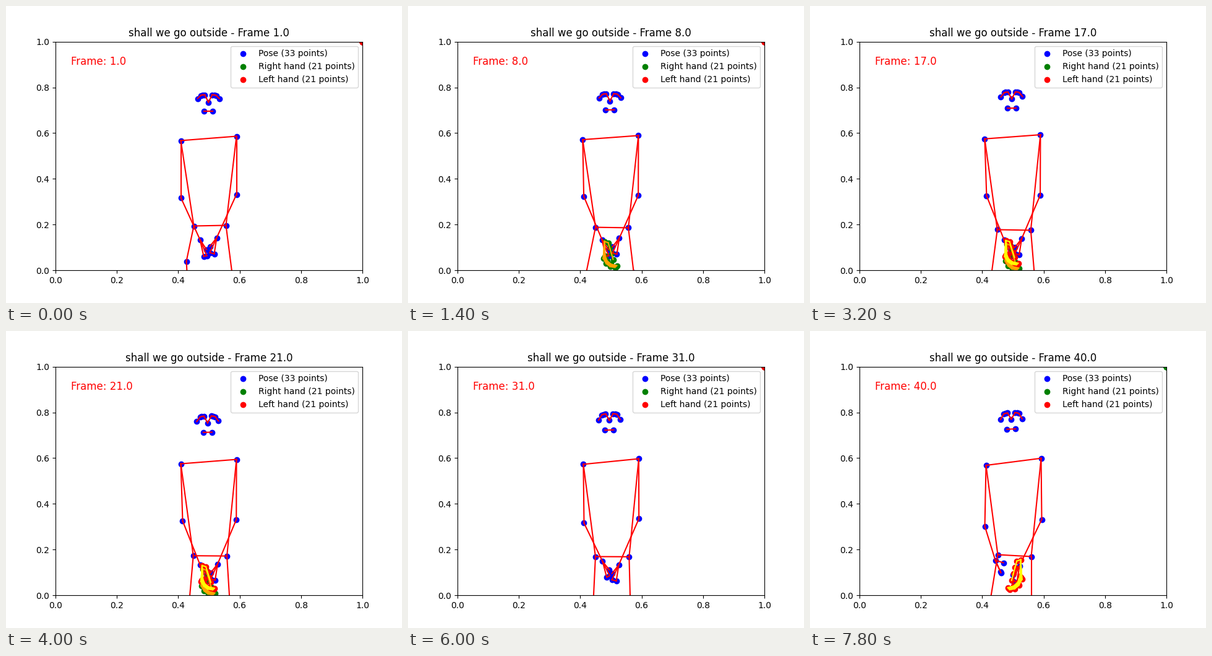
A matplotlib script that plays this animation: 640x480 px, repeating every 8 s.

```python
import numpy as np
import matplotlib.pyplot as plt
from matplotlib.animation import FuncAnimation
from matplotlib.collections import LineCollection

FRAMES, STEP = 40, 200

# Joint drift in stage pixels: start, end, bulge at mid-loop, double wave.
DRIFT = {
    "r_shoulder": ((282, 217), (284, 216.6), (-1, -2.7), (0, 0)),
    "l_shoulder": ((372, 210), (373, 205.2), (-0.5, -0.5), (0, 0)),
    "r_elbow": ((282, 309), (282, 315), (3, -5.5), (0, 0)),
    "l_elbow": ((372, 304), (374, 304), (-1.3, 0.5), (0, 1.5)),
    "l_wrist": ((340, 374), (338, 379), (2.5, -0.5), (0, 0)),
    "r_hip": ((303, 355), (303, 361), (-0.8, 4.5), (0, -1.5)),
    "l_hip": ((355, 354), (357, 364), (0.5, 4), (0, 0)),
    "r_knee": ((291, 412), (290, 440), (3, 30), (-6, 0)),
    "l_knee": ((366, 440), (357, 440), (0, 0), (0, -10)),
}

# Right wrist, pinky, index and thumb: resting, raised, lowered to the side.
R_ARM = np.array([[(313, 377), (319, 404), (324, 403), (323.5, 393)],
                  [(322, 328), (335, 341), (338, 325), (337, 321)],
                  [(299, 370), (307, 388), (308, 390), (312, 374)]])
L_GRIP = np.array([(-4, 26), (-11, 24), (-11, 14)])

# Half a face, ear to inner eye: distance from the midline, height, rise.
HALF_FACE = np.array([(17.5, 149, 7), (12.3, 144, 10.7), (9.5, 143.2, 11),
                      (6, 143, 11.3)])
NOSE, LIP = (0, 155, 13), (7, 169, 11)

BONES = [("r_shoulder", "l_shoulder"), ("r_hip", "l_hip")]
for s in "rl":
    BONES += [(f"{s}_{a}", f"{s}_{b}") for a, b in (
        ("shoulder", "elbow"), ("elbow", "wrist"), ("shoulder", "hip"),
        ("hip", "knee"), ("knee", "ankle"))]

HAND_LINKS = [(0, 17), (5, 9), (9, 13), (13, 17)]
for base in range(1, 21, 4):
    HAND_LINKS += [(0, base)] + [(k, k + 1) for k in range(base, base + 3)]


def to_data(points):
    """Pixel centres to axes coordinates."""
    p = np.asarray(points, float) + 0.5
    return np.stack([(p[..., 0] - 80) / 496, (427.2 - p[..., 1]) / 369.6], -1)


def chain(points):
    return list(zip(points[:-1], points[1:]))


def smooth(n, start, end):
    t = np.clip((n - start) / (end - start), 0, 1)
    return t * t * (3 - 2 * t)


def finger(knuckle, bend, tip):
    """Four joints along a quadratic curve."""
    t = np.linspace(0, 1, 4)[:, None]
    a, b, c = map(np.array, (knuckle, bend, tip))
    return (1 - t) ** 2 * a + 2 * t * (1 - t) * b + t ** 2 * c


HAND = np.vstack([np.zeros((1, 2)), finger((6, 2), (10, 15), (14, 29))]
                 + [finger((1 - k, 23 + 1.5 * k), (4, 38 + 1.5 * k),
                           (20 - k, 39 + k)) for k in range(4)])


def face(n):
    nod = min(1, (n - 1) / 34) ** 1.2
    mirror = (-1, 1, 1)
    rows = np.vstack([HALF_FACE * mirror, NOSE, HALF_FACE[::-1],
                      np.multiply(LIP, mirror), LIP])
    dx, y, rise = rows.T
    x = 326.7 - 1.9 * np.sqrt(nod) + dx
    return np.column_stack([x, y - nod * (rise + 0.04 * dx)])


def pose(n):
    t = (n - 1) / (FRAMES - 1)
    weights = 1 - t, t, np.sin(np.pi * t), np.sin(2 * np.pi * t)
    joints = {k: np.dot(weights, v) for k, v in DRIFT.items()}
    for s in "rl":
        joints[s + "_ankle"] = joints[s + "_knee"] + (4, 70)

    rest, raised, side = R_ARM
    arm = rest + (raised - rest) * smooth(n, 30, 35)
    arm += (side - raised) * smooth(n, 35, 40)
    joints["r_wrist"] = arm[0]

    head = face(n)
    segs = chain(head[:9]) + chain(head[9:])
    segs += [(joints[a], joints[b]) for a, b in BONES]
    points = list(head) + list(joints.values())
    l_wrist = joints["l_wrist"]
    for wrist, tips in ((arm[0], arm[1:]), (l_wrist, l_wrist + L_GRIP)):
        points += list(tips)
        segs += [(wrist, p) for p in tips] + [(tips[0], tips[1])]
    return to_data(points), to_data(segs)


def hand(wrist, scale):
    p = to_data(HAND * scale + wrist)
    return p, [(p[a], p[b]) for a, b in HAND_LINKS]


# An undetected hand collapses into the top right corner.
MISSING = np.ones((21, 2)), []


def right_hand(n):
    if 5 <= n <= 21:
        return hand((317, 380 + 4 * smooth(n, 8, 17)), (1, 1))
    return MISSING


def left_hand(n):
    if 11 <= n <= 28:
        return hand((316 + smooth(n, 17, 25), 378.5), (1, 0.94))
    if n >= 37:
        return hand((340, 369), (-1.05, 1.16))
    return MISSING


fig, ax = plt.subplots(figsize=(6.4, 4.8), dpi=100)
ax.set_xlim(0, 1)
ax.set_ylim(0, 1)

dots, lines = [], []
for color, line_color, label in (("blue", "red", "Pose (33 points)"),
                                 ("green", "orange", "Right hand (21 points)"),
                                 ("red", "yellow", "Left hand (21 points)")):
    dots.append(ax.scatter([], [], color=color, label=label))
    lines.append(LineCollection([], colors=line_color, linewidths=1.5,
                                capstyle="projecting", zorder=2))
    ax.add_collection(lines[-1], autolim=False)
ax.legend(loc="upper right")
title = ax.set_title("")
counter = ax.text(0.05, 0.9, "", color="red", fontsize=12)


def update(i):
    n = i + 1
    parts = pose(n), right_hand(n), left_hand(n)
    for dot, line, (points, segs) in zip(dots, lines, parts):
        dot.set_offsets(points)
        line.set_segments(segs)
    title.set_text(f"shall we go outside - Frame {n:.1f}")
    counter.set_text(f"Frame: {n:.1f}")
    return [*dots, *lines, title, counter]


anim = FuncAnimation(fig, update, frames=FRAMES, interval=STEP, repeat=True,
                     repeat_delay=0, blit=False)
plt.show()
```
